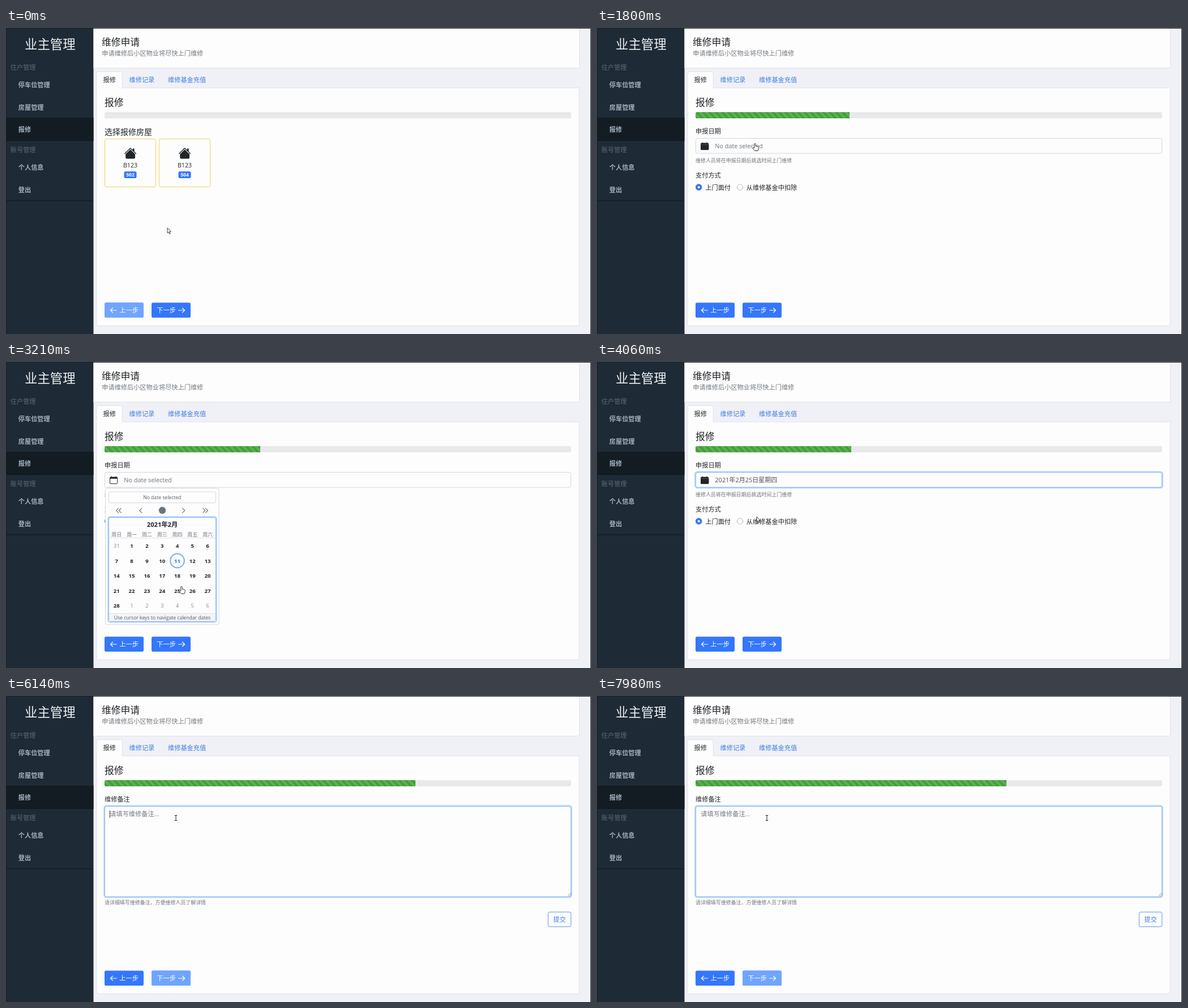
An HTML page for the animation above (8 s loop, 1033 by 542 pixels).

```html
<!DOCTYPE html>
<html lang="zh-CN">
<head>
<meta charset="utf-8">
<title>维修申请</title>
<style>
html, body { margin: 0; width: 100%; height: 100%; overflow: hidden; background: #f0f1f6; }
svg { position: absolute; left: 0; top: 0; display: block; }
text { font: 11.2px "Open Sans", "Noto Sans CJK SC", "Noto Sans CJK", "Noto Sans", sans-serif; fill: #212529; }
.mid { text-anchor: middle; }
.h1 { font-size: 22.4px; fill: #eef1f3; }
.h2 { font-size: 16.8px; }
.h3 { font-size: 14px; }
.nav { font-weight: 700; fill: #a4b3c1; }
.sec { fill: #5c6b79; }
.soft { fill: #737a80; }
.hint { font-size: 8.96px; fill: #6c757d; }
.latin { font-size: 10.8px; fill: #6c757d; }
.tiny { font-size: 8.6px; fill: #555c63; }
.link { fill: #3d7de6; }
.inv { fill: #fff; }
.badge { font-size: 8.4px; font-weight: 700; fill: #fff; }
.day { font-size: 9.6px; font-weight: 700; }
.other { font-weight: 400; fill: #868c92; }
.box { fill: #fdfdfd; stroke: #d3d7dc; }
.ring { fill: none; stroke: #bdd8fc; stroke-width: 2.4; }
.focus { fill: none; stroke: #86b4f8; }
.line { fill: none; stroke-linecap: round; stroke-linejoin: round; }
.blue { fill: #3477fb; }

/* One loop of 8 s; 1% = 80 ms */
.step { animation: 8s step-end infinite; }
.p1 { animation-name: p1; }
.p2 { animation-name: p2; }
.p3 { animation-name: p3; }
.empty { animation-name: empty; }
.picked { animation-name: picked; }
.solid { animation-name: solid; }
.cal { animation-name: cal; }
.ringed { animation-name: ringed; }
.onsite { animation-name: onsite; }
.fund { animation-name: fund; }
.hover { animation-name: hover; }
.note { animation-name: note; }
.arrow { animation-name: arrow; }
.hand { animation-name: hand; }
.beam { animation-name: beam; }
@keyframes p1 { 0% { opacity: 1 } 19.25% { opacity: 0 } 100% { opacity: 0 } }
@keyframes p2 { 0% { opacity: 0 } 19.25% { opacity: 1 } 69.25%, 100% { opacity: 0 } }
@keyframes p3 { 0% { opacity: 0 } 69.25%, 100% { opacity: 1 } }
@keyframes empty { 0% { opacity: 1 } 42.5%, 100% { opacity: 0 } }
@keyframes picked { 0% { opacity: 0 } 42.5%, 100% { opacity: 1 } }
@keyframes solid { 0% { opacity: 0 } 22.125% { opacity: 1 } 26.875% { opacity: 0 } 42.5% { opacity: 1 } 59.375%, 100% { opacity: 0 } }
@keyframes cal { 0% { opacity: 0 } 26.875% { opacity: 1 } 42.5%, 100% { opacity: 0 } }
@keyframes ringed { 0% { opacity: 0 } 42.5% { opacity: 1 } 59.375%, 100% { opacity: 0 } }
@keyframes onsite { 0% { opacity: 1 } 59.375%, 100% { opacity: 0 } }
@keyframes fund { 0% { opacity: 0 } 59.375%, 100% { opacity: 1 } }
@keyframes hover { 0% { opacity: 0 } 18% { opacity: 1 } 19.75% { opacity: 0 } 66% { opacity: 1 } 69.25%, 100% { opacity: 0 } }
@keyframes note { 0% { opacity: 0 } 76.25%, 100% { opacity: 1 } }
@keyframes arrow {
  0% { opacity: 1 } 8.125% { opacity: 0 } 16.25% { opacity: 1 } 18% { opacity: 0 } 19.75% { opacity: 1 }
  22.125% { opacity: 0 } 27.5% { opacity: 1 } 36.25% { opacity: 0 } 42.75% { opacity: 1 }
  66% { opacity: 0 } 69.5% { opacity: 1 } 72.5%, 100% { opacity: 0 }
}
@keyframes hand {
  0% { opacity: 0 } 8.125% { opacity: 1 } 16.25% { opacity: 0 } 18% { opacity: 1 } 19.75% { opacity: 0 }
  22.125% { opacity: 1 } 27.5% { opacity: 0 } 36.25% { opacity: 1 } 42.75% { opacity: 0 }
  66% { opacity: 1 } 69.5%, 100% { opacity: 0 }
}
@keyframes beam { 0% { opacity: 0 } 72.5%, 100% { opacity: 1 } }

.caret { animation: blink calc(8s / 15) -.3s step-end infinite; }
@keyframes blink { 0% { opacity: 1 } 50%, 100% { opacity: 0 } }

#pointer { animation: path 8s ease-in-out infinite; }
@keyframes path {
  0%, .6% { transform: translate(285px, 354px) }
  10.6%, 11.25% { transform: translate(246px, 258px) }
  14.1%, 15.9% { transform: translate(258px, 267px) }
  18.25%, 19.5% { transform: translate(286px, 498px) }
  22.3%, 26.9% { transform: translate(279px, 205px) }
  31.25% { transform: translate(444px, 300px) }
  34.4% { transform: translate(442px, 312px) }
  39.4%, 42.5% { transform: translate(310px, 398px) }
  47% { transform: translate(285px, 290px) }
  50%, 51% { transform: translate(282px, 274px) }
  57.5%, 60% { transform: translate(253px, 281px) }
  66.3%, 69.5% { transform: translate(286px, 498px) }
  75.4%, 100% { transform: translate(300px, 216px) }
}

#track { position: absolute; left: 174px; top: 149px; width: 824px; height: 11.2px; border-radius: 2.8px; background: #e7e9eb; overflow: hidden; }
#bar {
  height: 100%; background: #42a038 linear-gradient(45deg, #ffffff26 25%, #0000 25% 50%, #ffffff26 50% 75%, #0000 75%) 0 0 / 11.2px 11.2px;
  animation: fill 8s ease infinite, stripes .5s linear infinite;
}
@keyframes fill { 0%, 19.25% { width: 0 } 23%, 69.25% { width: 33.333% } 73%, 100% { width: 66.667% } }
@keyframes stripes { from { background-position: 11.2px 0 } to { background-position: 0 0 } }
</style>
</head>
<body>
<svg width="1033" height="542" viewBox="0 0 1033 542">
  <defs>
    <g id="house" fill="#212529">
      <path d="M8 3.293l6 6V13.5a1.5 1.5 0 0 1-1.5 1.5h-9A1.5 1.5 0 0 1 2 13.5V9.293zM13 2.5V6l-2-2V2.5a.5.5 0 0 1 .5-.5h1a.5.5 0 0 1 .5.5z"/>
      <path d="M7.293 1.5a1 1 0 0 1 1.414 0l6.647 6.646a.5.5 0 0 1-.708.708L8 2.207 1.354 8.854a.5.5 0 1 1-.708-.708z"/>
    </g>
    <g id="card">
      <rect x=".5" y=".5" width="90" height="85" rx="2.8" fill="#fdfdfd" stroke="#ecd269"/>
      <use href="#house" transform="translate(34.4 14.6) scale(1.4)"/>
      <text class="mid" x="45.5" y="50.8" style="font-size:10.6px">B123</text>
      <rect class="blue" x="34.5" y="58" width="22" height="12" rx="2.8"/>
    </g>
    <path id="go" class="line" d="M.5 0H11.5M7.5-4L11.5 0L7.5 4" stroke="#fff" stroke-width="1.1"/>
    <path id="chev" class="line" d="M2-4.2L-2.2 0L2 4.2" stroke="#6c757d" stroke-width="1.1"/>
    <g id="chevs"><use href="#chev" x="-2.2"/><use href="#chev" x="2.4"/></g>
  </defs>

  <rect width="1033" height="542" fill="#f0f1f6"/>

  <rect width="154.5" height="542" fill="#1e2a36"/>
  <rect y="159" width="154.5" height="41" fill="#141c23"/>
  <path d="M0 159.5H154M0 199.5H154M0 306H154" stroke="#10171d"/>
  <text class="h1 mid" x="77.8" y="36.8">业主管理</text>
  <text class="sec" x="7.8" y="74.2">住户管理</text>
  <text class="nav" x="21.8" y="105.2">停车位管理</text>
  <text class="nav" x="21.8" y="144.7">房屋管理</text>
  <text class="nav" x="21.8" y="183.7">报修</text>
  <text class="sec" x="7.8" y="220">账号管理</text>
  <text class="nav" x="21.8" y="251.2">个人信息</text>
  <text class="nav" x="21.8" y="290.7">登出</text>

  <path d="M154.500 0H1012.500V68.500a2.500 2.500 0 0 1-2.500 2.500H154.500z" fill="#fdfdfd"/>
  <path d="M154.500 71H1010a2.500 2.500 0 0 0 2.500-2.500V0" fill="none" stroke="#dee1e5"/>
  <text class="h2" x="169" y="31.4">维修申请</text>
  <text class="soft" x="169.300" y="49.2">申请维修后小区物业将尽快上门维修</text>

  <path d="M160 106H1012V524.500a2.800 2.800 0 0 1-2.800 2.800H162.800a2.800 2.800 0 0 1-2.800-2.800z" fill="#fdfdfd" stroke="#dee1e5"/>
  <path d="M160 107V80a2.800 2.800 0 0 1 2.800-2.800H202.500a2.800 2.800 0 0 1 2.800 2.800V106" fill="#fdfdfd" stroke="#dee1e5"/>
  <rect x="160.500" y="104.500" width="44.300" height="4" fill="#fdfdfd"/>
  <text x="171.500" y="95.800" fill="#495057">报修</text>
  <text class="link" x="217.500" y="95.800">维修记录</text>
  <text class="link" x="286" y="95.800">维修基金充值</text>
  <text class="h2" x="174" y="138.200">报修</text>

  <rect class="blue" x="174" y="486.500" width="69" height="26.500" rx="2.800"/>
  <rect class="step p1" x="174" y="486.500" width="69" height="26.500" rx="2.800" fill="#70a5fd"/>
  <use href="#go" transform="translate(196 500) scale(-1 1)"/>
  <text class="inv" x="200.300" y="504.200">上一步</text>
  <rect class="blue" x="257" y="486.500" width="69" height="26.500" rx="2.800"/>
  <rect class="step hover" x="257" y="486.500" width="69" height="26.500" rx="2.800" fill="#2b62d4"/>
  <rect class="step p3" x="257" y="486.500" width="69" height="26.500" rx="2.800" fill="#70a5fd"/>
  <text class="inv" x="266.300" y="504.200">下一步</text>
  <use href="#go" x="304" y="500"/>

  <g class="step p1">
    <text class="h3" x="174" y="188.700">选择报修房屋</text>
    <use href="#card" x="174" y="196"/>
    <use href="#card" x="270" y="196"/>
    <text class="badge mid" x="219.500" y="263.200">502</text>
    <text class="badge mid" x="315.500" y="263.200">504</text>
  </g>

  <g class="step p2">
    <text x="174" y="187.200">申报日期</text>
    <rect class="box" x="174.500" y="195.500" width="823" height="26.500" rx="2.800"/>
    <g class="step ringed">
      <rect class="ring" x="173.300" y="194.500" width="825.400" height="28.500" rx="4"/>
      <rect class="focus" x="174.500" y="195.500" width="823" height="26.500" rx="2.800"/>
    </g>
    <g fill="#212529">
      <rect x="183.500" y="204" width="13.300" height="11.600" rx="1.500" fill="none" stroke="#212529"/>
      <path d="M183.500 204H196.800V206.800H183.500zM185.800 202.500h1.200v2h-1.200zM193.300 202.500h1.200v2h-1.200z"/>
      <path class="step solid" d="M183 206.800H197.300V214.600a1.500 1.500 0 0 1-1.500 1.500H184.500a1.500 1.500 0 0 1-1.500-1.500z"/>
    </g>
    <text class="latin step empty" x="208.300" y="213.300">No date selected</text>
    <text class="step picked" x="208.300" y="213.300" style="font-size:11px;fill:#495057">2021年2月25日星期四</text>
    <text class="hint" x="174" y="238.400">维修人员将在申报日期后挑选时间上门维修</text>
    <text x="174" y="265.200">支付方式</text>
    <g fill="#fdfdfd" stroke="#adb5bd">
      <circle cx="179.700" cy="282" r="5.200"/>
      <circle cx="252.500" cy="282" r="5.200"/>
    </g>
    <g class="step onsite">
      <circle class="blue" cx="179.700" cy="282" r="5.700"/>
      <circle cx="179.700" cy="282" r="2.100" fill="#fff"/>
    </g>
    <g class="step fund">
      <circle cx="252.500" cy="282" r="7.800" fill="#bdd8fc"/>
      <circle class="blue" cx="252.500" cy="282" r="5.700"/>
      <circle cx="252.500" cy="282" r="2.100" fill="#fff"/>
    </g>
    <text x="191.300" y="286.500">上门面付</text>
    <text x="263.800" y="286.500">从维修基金中扣除</text>

    <g class="step cal">
      <rect class="box" x="175.500" y="223.500" width="200.500" height="241.500" rx="2.800"/>
      <rect class="box" x="181.500" y="230" width="189" height="19.500" rx="2.500"/>
      <text class="tiny mid" x="275.800" y="243">No date selected</text>
      <use href="#chevs" x="199" y="263"/>
      <use href="#chev" x="238" y="263"/>
      <circle cx="276" cy="262.800" r="6.200" fill="#6c757d"/>
      <use href="#chev" transform="translate(313.500 263) scale(-1 1)"/>
      <use href="#chevs" transform="translate(352 263) scale(-1 1)"/>
      <rect class="ring" x="180.300" y="274.300" width="191.400" height="186.400" rx="3.500"/>
      <rect class="focus" x="181.500" y="275.500" width="189" height="184" rx="2.500"/>
      <text class="mid" x="276" y="292.200" font-weight="700" style="font-weight:700">2021年2月</text>
      <path d="M182 311.800H370" stroke="#dee1e5"/>
      <rect x="182" y="445.500" width="188" height="13.500" fill="#f3f4f5"/>
      <path d="M182 445.300H370" stroke="#dee1e5"/>
      <text class="tiny mid" x="276" y="456">Use cursor keys to navigate calendar dates</text>
      <circle cx="302.500" cy="352" r="12.300" fill="#fdfdfd" stroke="#83b2f7" stroke-width="2.200"/>
      <g id="days"></g>
    </g>
  </g>

  <g class="step p3">
    <text x="174" y="187.200">维修备注</text>
    <rect class="box" x="174.500" y="195.500" width="823" height="160" rx="2.800"/>
    <g class="step note">
      <rect class="ring" x="173.300" y="194.500" width="825.400" height="162" rx="4"/>
      <rect class="focus" x="174.500" y="195.500" width="823" height="160" rx="2.800"/>
      <path class="caret" d="M183.300 203V216" stroke="#333"/>
    </g>
    <path d="M992 354L997 349M995 354.500L997.500 352" stroke="#777" stroke-width=".8"/>
    <text class="soft" x="183.300" y="213.300">请填写维修备注...</text>
    <text class="hint" x="174" y="368.800">请详细填写维修备注，方便维修人员了解详情</text>
    <rect x="957.300" y="382.700" width="40.400" height="26" rx="2.800" fill="#fdfdfd" stroke="#5e93f2"/>
    <text class="link mid" x="977.500" y="400.200">提交</text>
  </g>

  <path d="M0 .5H1032.500V542M.5 0V542" fill="none" stroke="#1b1d20"/>

  <g id="pointer">
    <path class="step arrow" d="M0 0V9.200L2.100 7.300L3.600 10.600L5.200 9.900L3.700 6.700H6.500z" fill="#fff" stroke="#222" stroke-width=".9"/>
    <path class="step hand" d="M-1.300 8V.800a1.200 1.200 0 0 1 2.400 0V4.300L5 5a1.500 1.500 0 0 1 1.200 1.500V9L5 12.500H-.500L-4 8.300a1.100 1.100 0 0 1 1.600-1.400z" fill="#fff" stroke="#222" stroke-width=".9"/>
    <path class="step beam line" d="M-1.800-4.500H1.800M0-4.500V4.500M-1.800 4.500H1.800" stroke="#222" stroke-width="1"/>
  </g>
</svg>
<div id="track"><div id="bar"></div></div>
<script>
const days = document.getElementById('days');
const colX = i => 195.3 + 26.8 * i;

function label(x, y, str, cls) {
  const el = document.createElementNS('http://www.w3.org/2000/svg', 'text');
  el.setAttribute('x', x);
  el.setAttribute('y', y);
  el.setAttribute('class', 'mid ' + cls);
  el.textContent = str;
  days.append(el);
  return el;
}

[...'日一二三四五六'].forEach((d, i) => label(colX(i), 309.2, '周' + d, 'hint'));

// February 2021 starts on a Monday, one cell after 31 January
for (let i = 0; i < 35; i++) {
  const inMonth = i >= 1 && i <= 28;
  const num = i === 0 ? 31 : inMonth ? i : i - 28;
  const y = 329 + 26.6 * Math.floor(i / 7);
  const el = label(colX(i % 7), y, num, inMonth ? 'day' : 'day other');
  if (i === 11) el.style.fill = '#3477d8';
}
</script>
</body>
</html>
```
